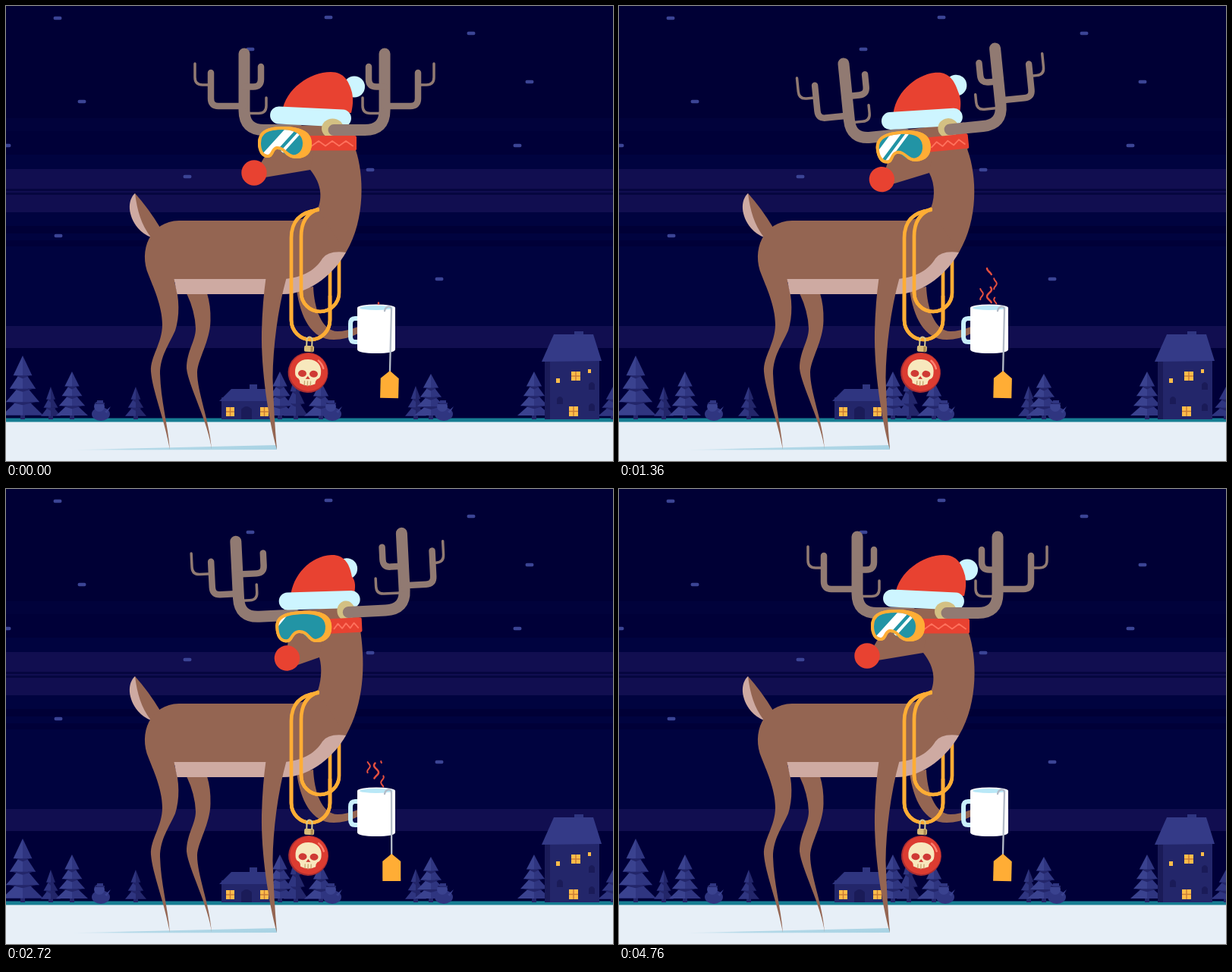
An HTML page with a canvas that plays this animation: 800x600 px, repeating every 4.8 s.

```html
<!DOCTYPE html>
<html lang="en">
<head>
<meta charset="utf-8">
<title>Reindeer with a mug</title>
<style>
html, body { margin: 0; width: 100%; height: 100%; overflow: hidden; background: #000035; }
canvas { display: block; width: 100%; height: 100%; }
</style>
</head>
<body>
<canvas id="stage" width="800" height="600"></canvas>
<script>
const ctx = document.getElementById('stage').getContext('2d');
const LOOP = 4800;
const FUR = '#946552', PALE = '#ceaaa2', RED = '#e84231', GOLD = '#ffad35', ICE = '#cdf5ff', HORN = '#917a72';
const NIGHT = { light: '#3a428f', mid: '#2f3580', dark: '#23266a', deep: '#1a1b58', lit: '#ffbd4a' };

const fill = (color, d) => { ctx.fillStyle = color; ctx.fill(new Path2D(d)); };
const stroke = (color, width, d) => {
  ctx.strokeStyle = color;
  ctx.lineWidth = width;
  ctx.stroke(new Path2D(d));
};
const rect = (color, x, y, w, h) => { ctx.fillStyle = color; ctx.fillRect(x, y, w, h); };
const ellipse = (color, x, y, rx, ry = rx) => {
  ctx.fillStyle = color;
  ctx.beginPath();
  ctx.ellipse(x, y, rx, ry, 0, 0, 7);
  ctx.fill();
};
const pill = (color, x, y, w, h, r) => {
  ctx.fillStyle = color;
  ctx.beginPath();
  ctx.roundRect(x, y, w, h, r);
  ctx.fill();
};
const turned = (x, y, angle, draw) => {
  ctx.save();
  ctx.translate(x, y);
  ctx.rotate(angle);
  ctx.translate(-x, -y);
  draw();
  ctx.restore();
};
const shifted = (dx, draw) => {
  ctx.save();
  ctx.translate(dx, 0);
  draw();
  ctx.restore();
};
// Eased value between [time, value] keys
function keyed(t, keys) {
  const i = keys.findIndex(k => k[0] > t);
  if (i < 0) return keys.at(-1)[1];
  const [t0, v0] = keys[i - 1], [t1, v1] = keys[i];
  const p = (t - t0) / (t1 - t0);
  return v0 + (v1 - v0) * p * p * (3 - 2 * p);
}

function tree(x, top, half, layers, bright) {
  const [left, right] = bright ? [NIGHT.light, NIGHT.mid] : [NIGHT.mid, NIGHT.dark];
  const step = (541 - top) / (layers + .4);
  rect(NIGHT.dark, x - 3, 535, 6, 10);
  for (let i = layers - 1; i >= 0; i--) {
    const y = top + i * step * .96, w = half * (.46 + .54 * i / (layers - 1)), b = y + step * 1.45;
    fill(left, `M${x} ${y}L${x - w} ${b}H${x}Z`);
    fill(right, `M${x} ${y}L${x + w} ${b}H${x}Z`);
    if (i < layers - 1) fill(NIGHT.dark, `M${x - w * .8} ${b}H${x + w * .8}L${x} ${b + 4}Z`);
  }
}

function snowman(x) {
  ellipse(NIGHT.mid, x, 538, 12, 9);
  ellipse(NIGHT.light, x - 2, 528, 7);
  rect(NIGHT.dark, x - 8, 523, 13, 2);
  rect(NIGHT.mid, x - 5, 520, 8, 4);
  fill(NIGHT.light, `M${x + 5} 535L${x + 13} 528L${x + 8} 537Z`);
}

function litWindow(x, y, w, h, bars) {
  rect(NIGHT.lit, x, y, w, h);
  if (!bars) return;
  rect('#c67b35', x + w / 2 - .7, y, 1.4, h);
  rect('#c67b35', x, y + h / 2 - .7, w, 1.4);
}

function backdrop() {
  rect('#000035', 0, 0, 800, 600);
  rect('#00033f', 0, 196, 800, 226);
  rect('#01023b', 0, 148, 800, 17);
  rect('#000038', 0, 165, 800, 31);
  rect('#110e50', 0, 215, 800, 57);
  rect('#06063f', 0, 241, 800, 3);
  rect('#06063f', 0, 246, 800, 3);
  rect('#000036', 0, 290, 800, 10);
  rect('#000038', 0, 309, 800, 8);
  rect('#110e50', 0, 422, 800, 29);
  rect('#000038', 0, 451, 800, 95);
  const stars = [[68, 16], [425, 15], [613, 36], [690, 100], [100, 126], [322, 57], [1, 184], [674, 184],
    [239, 225], [480, 216], [69, 303], [571, 360]];
  for (const [x, y] of stars) pill('#3b4495', x - 5.5, y - 2.2, 11, 4.4, 2.2);

  rect('#167d92', 0, 543.5, 800, 6);
  tree(59, 502, 13, 3, false);
  tree(22, 461, 27, 4, true);
  tree(87, 482, 21, 4, true);
  tree(171, 502, 14, 3, false);
  tree(382, 484, 16, 3, false);
  tree(361, 482, 21, 4, true);
  tree(415, 495, 22, 3, true);
  tree(540, 501, 14, 3, false);
  tree(560, 485, 22, 4, true);
  tree(696, 482, 22, 4, true);
  tree(800, 502, 20, 3, false);
  [125, 430, 577].forEach(snowman);

  // Cottage
  rect(NIGHT.dark, 284, 516, 68, 29);
  rect(NIGHT.mid, 321, 499, 10, 8);
  fill(NIGHT.mid, 'M281 521L297 505H343L354 521Z');
  fill(NIGHT.deep, 'M310 545V532Q317 524 324 532V545Z');
  litWindow(290, 529, 11, 12, true);
  litWindow(335, 529, 11, 12, true);

  // Tall house
  rect(NIGHT.dark, 710, 466, 72, 79);
  rect(NIGHT.deep, 710, 466, 7, 79);
  rect(NIGHT.mid, 749, 429, 12, 12);
  fill('#343a87', 'M706 469L722 433H774L785 468Z');
  for (const [x, y] of [[726, 515], [768, 496], [768, 524]]) fill(NIGHT.deep, `M${x} ${y + 10}V${y + 3}Q${x + 4} ${y - 3} ${x + 8} ${y + 3}V${y + 10}Z`);
  litWindow(745, 482, 12, 12, true);
  litWindow(742, 528, 12, 13, true);
  litWindow(725, 491, 5, 6);
  litWindow(767, 479, 4, 5);

  rect('#e7eff7', 0, 548.5, 800, 52);
  const shade = ctx.createLinearGradient(78, 0, 357, 0);
  shade.addColorStop(0, '#b5d9e800');
  shade.addColorStop(.3, '#b5d9e8');
  shade.addColorStop(1, '#a9d3e4');
  fill(shade, 'M78 585.5L357 579V585Z');
}

function limbs() {
  // Tail
  fill(FUR, 'M170 247Q188 267 203 292L191 305C178 292 168 270 170 247Z');
  fill(PALE, 'M170 247C160 256 160 276 174 293Q181 301 191 305C178 288 173 270 170 247Z');
  // Far hind leg, arm
  fill(FUR, 'M238 379Q249 402 250 425C250 442 238 455 238 478C240 500 267 550 271 585C268 545 252 510 252 483C253 465 269 442 269.500 415Q270 395 265 379Z');
  fill(FUR, 'M383 374C388 410 402 440 432 440Q448 440 464 432V423Q448 429 437 429C416 429 406 398 405 370Z');
}

function necklace() {
  stroke(GOLD, 4.7, 'M411 269Q376 273 376 306V414A25.500 26 0 0 0 427 414V345');
  stroke(GOLD, 4.7, 'M411 268Q389 276 389 304V378A25 25 0 0 0 439 378V334');
}

function torso() {
  fill(FUR, 'M228 283H378Q400 281 411 268L448 325L425 346L368 364H222C229 385 229 410 223 428C215 446 203 462 203 485C204 520 213 550 216 585C209 545 193 508 191 482C190 462 206 445 206 420C206 395 193 368 188 355C174 322 190 284 228 283Z');
  fill(PALE, 'M221.500 360H367C392 358 409 347 417 333Q425 322 448 325C434 350 403 380 365 380H225.500Z');
  fill(FUR, 'M342.500 359H369.500C358 400 352 450 351.500 490Q353 540 357 585C346 545 336 480 337 430Q338 390 342.500 359Z');
}

function frontChain() {
  ctx.save();
  ctx.clip(new Path2D('M360 260H413V382H441V460H360Z'));
  necklace();
  ctx.restore();
}

function ornament(t) {
  const swing = -Math.cos(t / 1200 * 2 * Math.PI - .7);
  turned(400, 441, -swing * .06, () => {
    stroke('#d8c98d', 2, 'M396.500 449V440A3.500 3.500 0 0 1 403.500 440V449');
    ellipse('#a92d31', 400, 483.500, 26.500);
    ellipse('#dc3c31', 400.500, 483, 25);
    pill('#d9bd79', 393.500, 448, 13, 8, 2);
    rect('#a9874f', 402, 449, 3, 7);
    stroke('#ff8171', 2.500, 'M413 467Q418 471 420 477');
    fill('#f7e8bd', 'M400 466C388 466 382 474 383 484Q383 490 388 492Q390 494 390 498Q400 503 410 498Q410 494 412 492Q417 490 417 484C418 474 412 466 400 466Z');
    ellipse('#cf3a35', 392.500, 485, 5.500, 4.500);
    ellipse('#cf3a35', 407.500, 485, 5.500, 4.500);
    fill('#cf3a35', 'M400 488L397 492H403Z');
    stroke('#c6a36d', 1.300, 'M396 495V500M400 495V501M404 495V500');
  });
}

function mug(t) {
  stroke('#c9effb', 6, 'M464 412H460Q454 412 454 419V436Q454 443 460 443H464');
  fill('#fff', 'M463 398V453Q464 458 488 458Q512 458 513 453V398Z');
  ellipse('#fff', 488, 398, 25, 4.500);
  ellipse('#b9e8f7', 488, 398, 22, 3);
  const lean = keyed(t, [[0, -1], [2100, -.9], [3300, 1], [4150, 1], [4750, -1]]);
  stroke('#b3bbc7', 2.300, 'M499 402Q500 397 504 396.500Q508 396 508 401');
  turned(508, 400, -lean * .025, () => {
    stroke('#b3bbc7', 2.300, 'M508 400V484');
    fill(GOLD, 'M508 481L520 491V517H496V491Z');
  });
}

// Wavy puffs travel upward, visible only between the top and the rim of the mug
function plume(t, p) {
  for (const passing of p.times) {
    const center = p.mark + (passing - t) * p.speed;
    const from = Math.max(p.top, center - p.size / 2), to = Math.min(392, center + p.size / 2);
    if (from >= to) continue;
    let d = 'M';
    for (let y = from; y < to + 1; y++) d += `${p.x + p.amp * Math.sin((y - p.top - p.wave / 4) / p.wave * 2 * Math.PI)} ${y} `;
    stroke('#e5503f', p.width, d);
  }
}

function steam(t) {
  plume(t, { x: 488, top: 346, amp: 3, wave: 18.500, size: 20, mark: 350, speed: .043, width: 2.500, times: [1200, 2080, 3220, 4120] });
  plume(t, { x: 478, top: 358.500, amp: 1.800, wave: 14, size: 14, mark: 366, speed: .027, width: 2, times: [1880, 2760, 4000] });
  plume(t, { x: 496, top: 359, amp: 1.800, wave: 14, size: 14, mark: 368, speed: .028, width: 2, times: [1300, 2200, 3340, 4180] });
}

function antler(base, stem, inner, outer, tip, spur) {
  const branch = (width, x, top, joint, end) => {
    const r = Math.min(10, Math.abs(end - x)) * Math.sign(end - x);
    stroke(HORN, width, `M${x} ${top}V${joint - 10}Q${x} ${joint} ${x + r} ${joint}H${end}`);
  };
  const bend = 26 * Math.sign(base - stem);
  stroke(HORN, 15, `M${stem} 63V138Q${stem} 163.500 ${stem + bend} 163.500H${base}`);
  branch(8.500, inner, 80, 106.500, stem);
  branch(8.500, outer, 88, 132, stem);
  branch(3.500, tip, 76, 104, outer);
  branch(3.500, spur, 121, 141.500, stem);
}

function head(t) {
  const turn = keyed(t, [[0, 0], [100, 0], [520, .16], [2300, .28], [3160, 1], [3420, 1], [3960, 0]]);
  const tilt = keyed(t, [[0, 0], [100, 0], [520, 5.900], [2300, 5.500], [3160, 0]]);
  const angle = tilt * Math.PI / 180;
  const mix = (a, b) => a + (b - a) * turn;
  // Path blended between side view and front view
  const morph = (a, b) => {
    const goal = b.match(/[\d.]+/g);
    let i = 0;
    return a.replace(/[\d.]+/g, n => mix(+n, +goal[i++]));
  };
  const tilted = draw => turned(430, 170, -angle, draw);
  const jawX = mix(401, 416), jawY = mix(216, 224);
  const nape = mix(461, 475) - tilt * .8;

  tilted(() => {
    shifted(-tilt * 1.25, () => {
      antler(385, mix(314, 310), mix(336, 353), mix(270, 282), mix(249, 254), mix(343, 332));
      ellipse(ICE, mix(459, 454), mix(106.500, 106), 14);
    });
    fill(FUR, morph('M336 207L348 186L376 158L452 156L456 190L401 216L338 226.500Z',
      'M388 205L388 186L390 158L472 156L472 190L416 224L392 236Z'));
  });

  const jx = jawX + (jawY - 170) * Math.sin(angle), jy = jawY - (jawX - 430) * Math.sin(angle);
  fill(FUR, `M408 274C${mix(418, 415)} 255 ${mix(417, 417)} 236 ${jx} ${jy}L${jx + 8} 170H${nape - 3}L${nape} 190
    C${mix(471, 475)} ${mix(220, 240)} ${mix(475, 470)} ${mix(280, 285)} 448 325L410 310Z`);

  tilted(() => {
    shifted(-tilt * .9, () => {
      fill(RED, morph('M364 139C368 110 400 87 428 87C446 87 452 100 456 114C458 124 457 132 455 141Z',
        'M388 139C392 112 412 87 440 87C452 87 463 95 464 118C471 122 470 132 467 141Z'));
      const bx = mix(401.500, 426);
      turned(bx, 146, mix(.047, .005), () => pill(ICE, bx - 53.500, 134.500, 107, 23, 11.500));
    });

    shifted(-tilt * .4, () => {
      ellipse('#d3c083', mix(430.500, 461), 161.500, mix(14.500, 10), 13);
      antler(mix(432, 465), mix(499, 545), mix(478, 515), mix(543, 581), mix(564, 592), mix(470, 503));
    });

    // Goggle strap
    const left = mix(396, 444) - tilt * .5, right = mix(462, 477) - tilt;
    pill(RED, left, 171, right - left, 19.500, 2);
    let zig = 'M';
    for (let i = 0; i < 7; i++) zig += `${left + 7 + i * (right - left - 12) / 6} ${i % 2 ? 178 : 184.500} `;
    stroke('#ff725d', 1.800, zig);

    ellipse(RED, mix(327, 392), 220, 16.700);
    shifted(-tilt * .5, () => goggles(morph, mix));
  });
}

function goggles(morph, mix) {
  const shape = morph(
    'M332 181C332 164 345 159 365 159C385 159 403 164 403 181C403 195 395 201 383 201C368 201 366 188 357 189C352 190 353 200 345 200C337 200 332 192 332 181Z',
    'M370.500 178C370.500 162 385 159 408 159C432 159 446 164 446 180C446 196 436 201 426 201C415 201 416 187 404 187C393 187 394 199 385 199C374 199 370.500 190 370.500 178Z');
  fill(GOLD, shape);
  const lens = new Path2D();
  const sx = mix(.79, .89), sy = .81;
  lens.addPath(new Path2D(shape), new DOMMatrix([sx, 0, 0, sy, mix(363, 406.500) - mix(367.500, 408.250) * sx, 180 * (1 - sy)]));
  ctx.save();
  ctx.clip(lens);
  rect('#2294a5', 320, 150, 140, 60);
  const x = mix(335, 373) + mix(40, -30);
  stroke('#fff', 4, `M${x - 20} 202L${x + 20} 158`);
  stroke('#fff', 11, `M${x - 36} 202L${x + 4} 158`);
  ctx.restore();
  // Rim keeps an even width along the nose notch
  ctx.save();
  ctx.clip(new Path2D(shape));
  stroke(GOLD, 8, shape);
  ctx.restore();
}

function frame(now) {
  const t = now % LOOP;
  ctx.lineCap = ctx.lineJoin = 'round';
  backdrop();
  limbs();
  necklace();
  head(t);
  torso();
  frontChain();
  ornament(t);
  mug(t);
  steam(t);
  requestAnimationFrame(frame);
}
requestAnimationFrame(frame);
</script>
</body>
</html>
```
